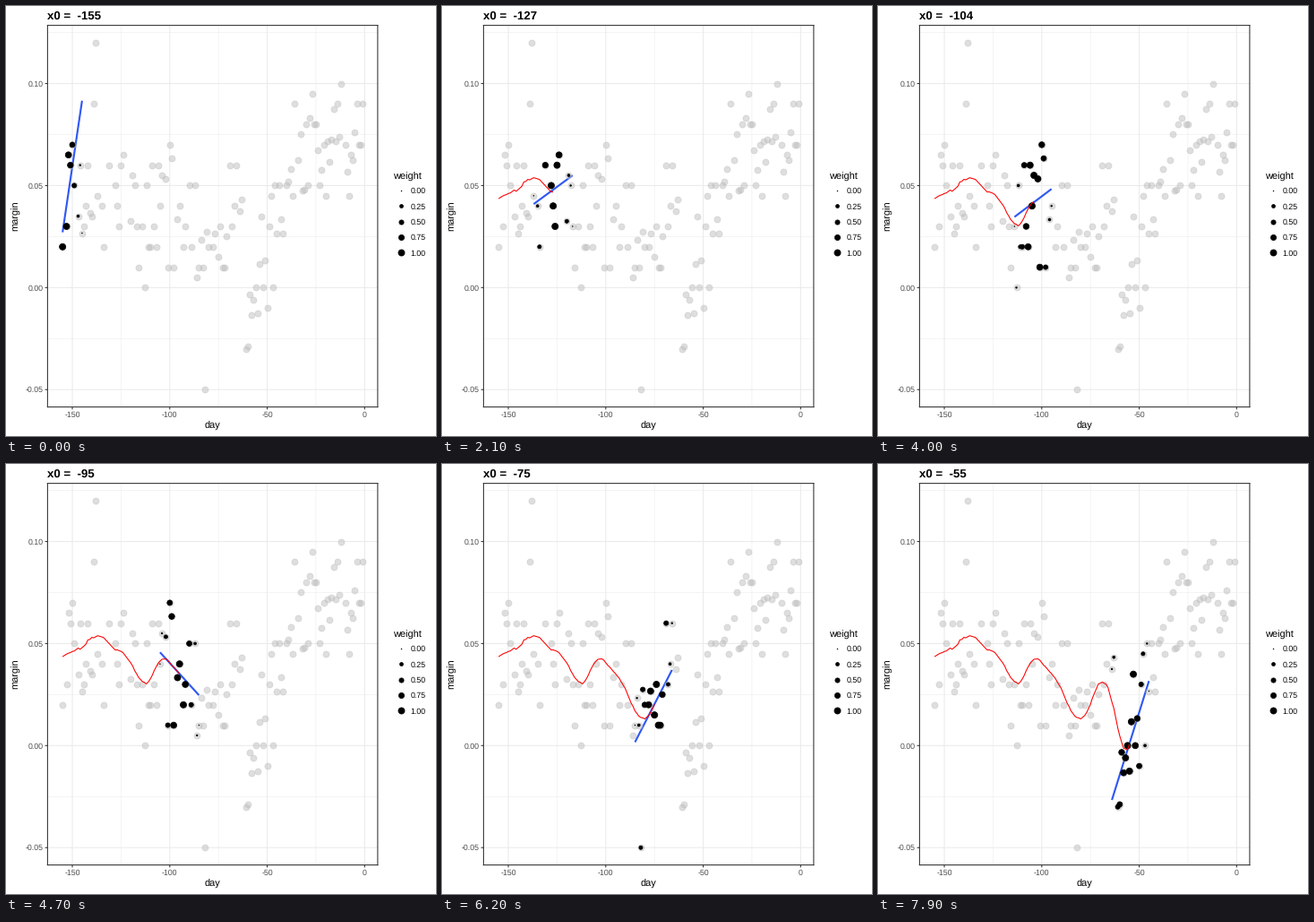
Write a matplotlib script that moves like this. It is 480x480 px and loops after 8000 ms.

```python
import numpy as np
import matplotlib.pyplot as plt
from matplotlib.animation import FuncAnimation

plt.rcParams.update({"font.family": "Liberation Sans", "path.snap": False,
                     "text.hinting": "none"})

SIZE = 480
LEFT, RIGHT, TOP, BOTTOM = 46.4, 414.9, 21.6, 447.6
INK, LABEL, GRID = "#333333", "#4D4D4D", "#EBEBEB"
THIN, STROKE = 1.07, 0.71
STEPS, HALF_WINDOW, NEIGHBOURS, CELL = 80, 10, 17, 3

# Days without a reading, and the margin in percent for all the others
GAPS = {-154, -148, -136, -133, -132, -130, -129, -123, -122, -121, -115, -103,
        -97, -94, -91, -88, -79, -76, -70, -65, -62, -41, -35, -11}
day = np.array([d for d in range(-155, 0) if d not in GAPS], float)
margin = np.array([
    2, 3, 6.5, 6, 7, 5, 3.5, 6, 2.67, 3, 4, 6, 3.67, 3.5, 9, 12, 4.5, 4, 2, 6,
    5, 4, 3, 6, 6.5, 3.25, 5.5, 5, 3, 1, 3, 0, 5, 2, 2, 6, 3, 2, 6, 4, 5.5,
    5.33, 1, 7, 6.33, 1, 3.33, 4, 2, 3, 5, 2, 5, .5, 1, 2.33, 1, -5, 2.75, 2,
    2, 2.67, 1.5, 3, 1, 1, 2.5, 6, 3, 4, 6, 3.75, 4.33, -3, -2.88, -.33,
    -1.33, -.6, 0, -1.25, 1.17, 3.5, 0, 1.33, -1, 3, 4.5, 0, 5, 2.67, 5, 3.33,
    2.67, 5, 5.2, 5.83, 4.5, 9, 6.25, 7.5, 4.75, 4.8, 8, 5, 8.33, 9.5, 8, 8,
    6.75, 5, 5.75, 7, 4.5, 7.17, 6.17, 7.25, 8.75, 7.17, 9, 7.4, 10, 7, 5.67,
    4.5, 6.5, 6.25, 7.6, 9, 7, 7, 9]) / 100


def tricube(dist, width):
    return np.clip(1 - (dist / width) ** 3, 0, 1) ** 3


def local_line(x0, width):
    """Slope and height at x0 of the weighted line around it."""
    w = tricube(abs(day - x0), width)
    use = w > 0
    return np.polyfit(day[use] - x0, margin[use], 1, w=np.sqrt(w[use]))


def cuts(xs):
    if len(xs) <= CELL:
        return []
    m = (len(xs) + 1) // 2
    return cuts(xs[:m]) + [(xs[m - 1] + xs[m]) / 2] + cuts(xs[m:])


def loess():
    """Local lines at the cell borders, blended by cubic Hermite pieces."""
    pad = 0.005 * np.ptp(day)
    knots = np.array([day[0] - pad, *cuts(day), day[-1] + pad])
    fits = [local_line(k, np.sort(abs(day - k))[NEIGHBOURS - 1]) for k in knots]
    slope, height = np.array(fits).T
    i = np.searchsorted(knots, day) - 1
    h = knots[i + 1] - knots[i]
    t = (day - knots[i]) / h
    return ((1 + 2 * t) * (1 - t) ** 2 * height[i]
            + t * (1 - t) ** 2 * h * slope[i]
            + t * t * (3 - 2 * t) * height[i + 1]
            + t * t * (t - 1) * h * slope[i + 1])


def dot_area(w):
    return ((3 * np.sqrt(w) * 2.845 + 0.945) * 0.75) ** 2


smooth = loess()

fig = plt.figure(figsize=(SIZE / 72, SIZE / 72), dpi=72, facecolor="white")
page = fig.add_axes([0, 0, 1, 1], xlim=(0, SIZE), ylim=(SIZE, 0))
page.axis("off")
ax = fig.add_axes([LEFT / SIZE, 1 - BOTTOM / SIZE,
                   (RIGHT - LEFT) / SIZE, (BOTTOM - TOP) / SIZE],
                  xlim=(-162.7, 6.7), ylim=(-0.0585, 0.1285))
ax.set(xticks=[], yticks=[])
for spine in ax.spines.values():
    spine.set(color=INK, linewidth=THIN, zorder=9)


def text(x, y, s, size=8.8, **kw):
    return page.text(x, y, s, fontsize=size, va="baseline",
                     rotation_mode="anchor", **kw)


def tick(xs, ys):
    page.plot(xs, ys, color=INK, lw=THIN, solid_capstyle="butt")


# Grid, ticks and labels
for x in (-125, -75, -25):
    ax.axvline(x, color=GRID, lw=THIN / 2, zorder=0)
for y in (-0.025, 0.025, 0.075, 0.125):
    ax.axhline(y, color=GRID, lw=THIN / 2, zorder=0)
for x in (-150, -100, -50, 0):
    ax.axvline(x, color=GRID, lw=THIN, zorder=0)
    px = LEFT + (x + 162.7) / 169.4 * (RIGHT - LEFT)
    tick([px, px], [BOTTOM, BOTTOM + 2.75])
    text(px, 458.8, str(x), color=LABEL, ha="center")
for y in (-0.05, 0, 0.05, 0.1):
    ax.axhline(y, color=GRID, lw=THIN, zorder=0)
    py = BOTTOM - (y + 0.0585) / 0.187 * (BOTTOM - TOP)
    tick([LEFT - 2.75, LEFT], [py, py])
    text(41.5, py + 3.15, f"{y:.2f}", color=LABEL, ha="right")

text((LEFT + RIGHT) / 2, 472, "day", 11, ha="center")
text(13.5, (TOP + BOTTOM) / 2, "margin", 11, ha="center", rotation=90)
title = text(LEFT, 15, "", 13.2, weight="bold")

# Legend
text(432.3, 194, "weight", 11)
for k in range(5):
    y = 206.2 + 17.28 * k
    page.scatter(440.9, y, s=dot_area(k / 4), color="black", lw=STROKE)
    text(451.6, y + 3.15, f"{k / 4:.2f}")

# Data layers
line, = ax.plot([], [], color="#2F58F5", lw=2.13, solid_capstyle="butt", zorder=2)
ax.scatter(day, margin, s=dot_area(1), color="#BEBEBE", alpha=0.5,
           lw=STROKE, zorder=3)
dots = ax.scatter([], [], color="black", lw=STROKE, zorder=4)
trail, = ax.plot([], [], color="red", lw=THIN, solid_capstyle="butt", zorder=5)


def draw(i):
    x0 = day[i]
    near = abs(day - x0) <= HALF_WINDOW
    xs = day[near]
    slope, height = local_line(x0, HALF_WINDOW)
    ends = np.array([xs[0], xs[-1]])
    line.set_data(ends, height + slope * (ends - x0))
    dots.set_offsets(np.column_stack([xs, margin[near]]))
    dots.set_sizes(dot_area(tricube(abs(xs - x0), HALF_WINDOW)))
    trail.set_data(day[:i + 1], smooth[:i + 1])
    title.set_text(f"x0 =  {x0:.0f}")
    return line, dots, trail, title


anim = FuncAnimation(fig, draw, frames=STEPS, interval=100, repeat=True)
plt.show()
```
